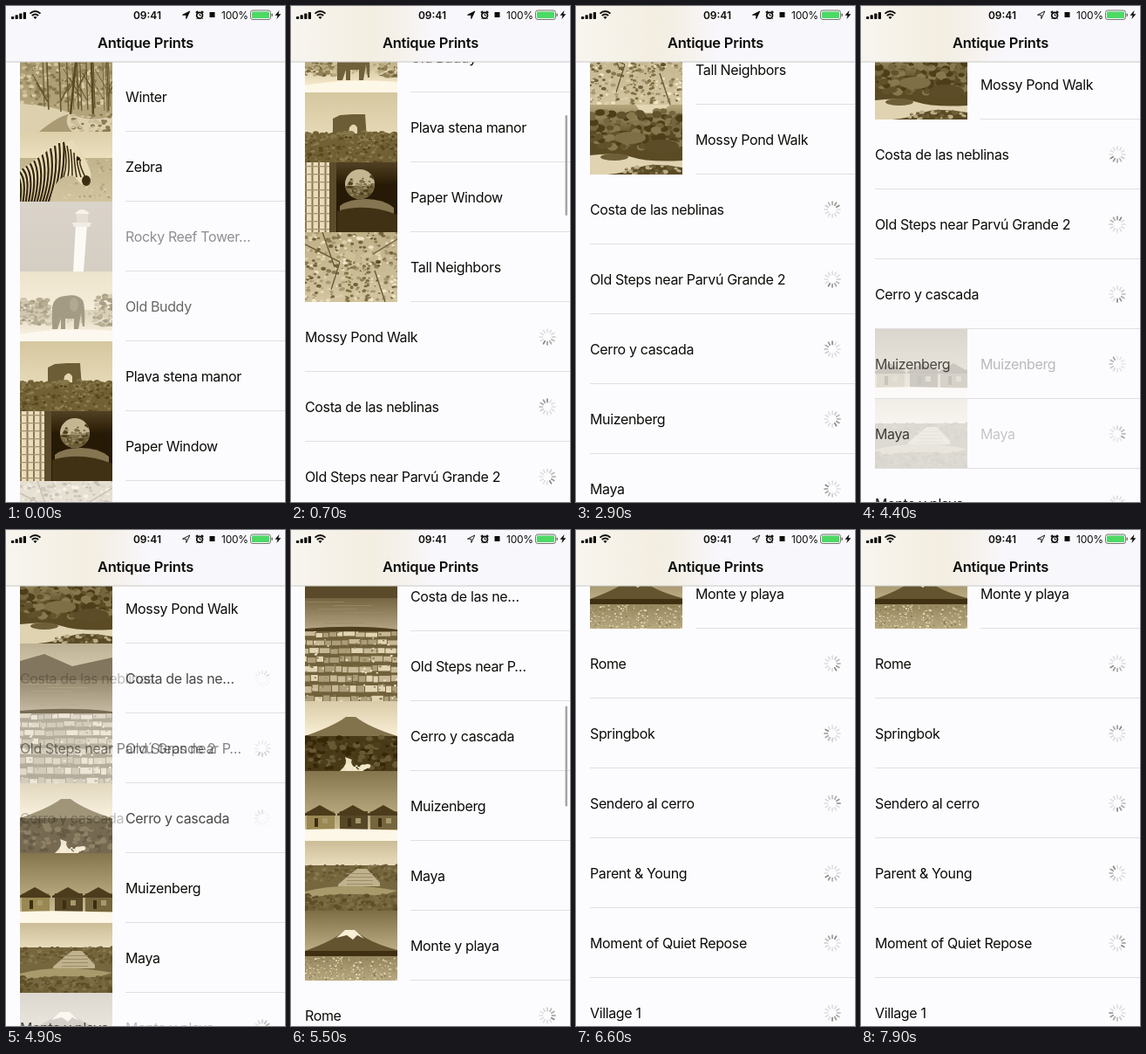
An HTML page with a canvas for the animation above (8 s loop, 320 px wide and 568 px high).

```html
<!DOCTYPE html>
<html lang="en">
<head>
<meta charset="utf-8">
<title>Photo list</title>
<style>
html, body { margin: 0; width: 100%; height: 100%; overflow: hidden; background: #fcfcff; }
canvas { display: block; width: 320px; height: 568px; }
</style>
</head>
<body>
<canvas id="stage"></canvas>
<script>
const W = 320, H = 568, NAV = 64, ROW = 80, LOOP = 8000;
const INK = '#0c0c08';
const dpr = window.devicePixelRatio || 1;
const stage = document.getElementById('stage');
stage.width = W * dpr;
stage.height = H * dpr;
const c = stage.getContext('2d');
const clamp = (v, a = 0, b = 1) => Math.min(b, Math.max(a, v));

// ---- thumbnails, each 106 x 80 ----
let g, seed;
const rnd = () => (seed = seed * 16807 % 2147483647) / 2147483647;
const shape = (color, d) => { g.fillStyle = color; g.fill(new Path2D(d)); };
const box = (color, x, y, w, h) => { g.fillStyle = color; g.fillRect(x, y, w, h); };
function line(color, width, d) {
  g.strokeStyle = color;
  g.lineWidth = width;
  g.stroke(new Path2D(d));
}
function oval(color, x, y, rx, ry) {
  g.fillStyle = color;
  g.beginPath();
  g.ellipse(x, y, rx, ry, 0, 0, 7);
  g.fill();
}
function fade(top, bottom, y = 0, h = 80) {
  const f = g.createLinearGradient(0, y, 0, y + h);
  f.addColorStop(0, top);
  f.addColorStop(1, bottom);
  box(f, 0, y, 106, h);
}
function dots(n, x, y, w, h, size, ...colors) {
  for (let i = 0; i < n; i++) {
    const r = size * (.5 + rnd());
    oval(colors[i % colors.length], x + rnd() * w, y + rnd() * h, r * 1.4, r);
  }
}

const scenes = [
  () => { // snowy wood
    fade('#a89c68', '#b5aa7a');
    dots(220, 0, 0, 106, 50, 1.5, '#85794a', '#c4ba90', '#d6cda8', '#968a58');
    shape('#d9d2b0', 'M0 48Q40 50 60 60T106 62V80H0Z');
    for (let i = 0; i < 14; i++) {
      const x = 4 + rnd() * 98, y = 15 + rnd() * 25, side = rnd() < .5 ? -12 : 12;
      line('#655a2c', .7 + rnd(), `M${x} 0L${x + 2} ${50 + rnd() * 8}M${x + 1} ${y + 10}L${x + side} ${y - 12}`);
    }
    line('#574b1e', 2.5, 'M64 0L58 60M82 0L84 62');
    shape('#a79c70', 'M22 80Q44 62 56 60Q50 70 60 80Z');
    dots(50, 60, 58, 46, 22, 1.5, '#8a7d4c', '#c8be98');
  },
  () => { // zebra
    fade('#d9d1a8', '#e8e1c2', 0, 30);
    fade('#bfb586', '#cfc69e', 30, 50);
    dots(60, 50, 32, 56, 45, 1, '#b0a678', '#d9d1b0');
    const body = 'M0 44Q22 30 36 18Q48 9 54 13L60 9L64 15Q74 26 81 46Q83 60 75 62Q68 60 62 50Q50 50 44 56Q36 66 35 80H0Z';
    shape('#e4dcbc', body);
    g.save();
    g.clip(new Path2D(body));
    for (let i = 0; i < 13; i++)
      line('#33290f', 2.2, `M${i * 5 - 10} ${46 - i * 3}Q${i * 4 + 5} 48 ${i * 3.2} 82`);
    for (let i = 0; i < 6; i++)
      line('#33290f', 1.5, `M${50 + i * 4} ${12 + i * 4}Q${56 + i * 2} 34 ${50 + i * 5} 52`);
    g.restore();
    oval('#3a2f14', 76, 56, 5, 6);
    oval('#1b1604', 67, 31, 2, 2);
  },
  () => { // lighthouse
    fade('#b0a394', '#a39782');
    shape('#fbf8ee', 'M64 26H77L73 80H61Z');
    shape('#e4dccc', 'M60 24H82L80 29H62Z');
    box('#c9beae', 65, 13, 13, 11);
    shape('#f0eade', 'M63 14Q71 4 80 14Z');
  },
  () => { // elephant
    fade('#e2d8a8', '#eee7c8', 0, 44);
    fade('#c9be8a', '#fbf8ea', 44, 36);
    dots(150, -4, 32, 38, 28, 1.8, '#8f834c', '#b5aa78', '#75693a');
    dots(90, 86, 28, 24, 34, 1.8, '#8f834c', '#c0b688', '#75693a');
    dots(60, 30, 48, 60, 10, 1.5, '#b5aa78', '#cfc69a');
    shape('#6f6238', 'M37 66V42Q38 29 52 28Q66 25 72 33Q75 40 74 63H72L70 48L67 66H62V54H52V66H47V54L43 66Z');
    oval('#85794e', 62, 38, 5, 8);
    shape('#fbf8ea', 'M0 72Q50 63 106 68V80H0Z');
  },
  () => { // ruin
    fade('#d3c99c', '#e4dcb8', 0, 52);
    box('#6f622c', 0, 47, 106, 33);
    shape('#6a5e32', 'M32 54V30L40 26L54 25L69 25L71 54H60V40Q56 33 51 40L49 54Z');
    dots(90, 0, 46, 106, 6, 2, '#6f622c', '#85783f');
    dots(260, 0, 50, 106, 30, 1.2, '#574a1a', '#8a7d45', '#72652e');
  },
  () => { // screen and round window
    box('#241a0c', 0, 0, 106, 80);
    fade('#4f4028', '#241a0c', 0, 26);
    box('#e6dec0', 0, 0, 30, 80);
    for (let x = 0; x < 31; x += 7.5) box('#8a7a50', x, 0, 2, 80);
    for (let y = 4; y < 80; y += 9) box('#a3956c', 0, y, 30, 1.3);
    box('#5b4c2c', 28, 0, 8, 80);
    oval('#c2b78e', 63, 25, 17, 17);
    g.save();
    g.beginPath();
    g.arc(63, 25, 17, 0, 7);
    g.clip();
    box('#6b5f36', 46, 27, 34, 15);
    dots(60, 46, 16, 34, 24, 1.4, '#7d7148', '#958a60', '#4d4220');
    g.restore();
    shape('#857650', 'M40 60V50Q50 42 70 42T102 52V62Z');
    shape('#3d3119', 'M37 80V56Q70 46 106 60V80Z');
  },
  () => { // giraffes
    fade('#bdb282', '#cfc69e');
    dots(320, 0, 0, 106, 80, 1.4, '#877b4c', '#d8d0a8', '#a59a6c', '#ece5c8', '#6e6238');
    line('#6a5d34', 1.4, 'M0 14L40 34L30 66M106 8L70 30M20 0L34 40M92 80L80 44');
    for (const [x, lean] of [[54, -8], [68, 9]]) {
      line('#cdc294', 7, `M${x} 80Q${x + lean} 52 ${x} 28L${x + lean} 24`);
      for (let y = 30; y < 78; y += 5) dots(3, x - 4 + lean * .4, y, 7, 4, 1.1, '#7d7040');
    }
    oval('#5a4e2a', 84, 34, 3, 2);
  },
  () => { // pond garden
    fade('#b5a878', '#5a4d24', 0, 36);
    box('#594c22', 0, 30, 106, 50);
    shape('#e0d8b4', 'M52 0H92L78 12L58 8Z');
    dots(170, 0, 7, 106, 43, 3, '#4b3f18', '#74683a', '#5f5328', '#857a48');
    oval('#7d7140', 46, 38, 18, 7);
    oval('#5a4e26', 82, 48, 20, 8);
    shape('#ddd5b2', 'M0 58Q30 54 48 60T106 64V72Q70 66 56 72T20 80H0Z');
    oval('#6c6034', 28, 60, 16, 4);
    dots(30, 40, 70, 66, 10, 1.8, '#6d6136', '#b9ae84');
  },
  () => { // lake
    fade('#a89a70', '#c4b88c', 0, 30);
    shape('#584b2a', 'M0 20L28 12L60 26L106 16V45H0Z');
    fade('#75663f', '#b5a888', 42, 38);
    for (let i = 0; i < 7; i++) box('#9c8d66', rnd() * 60, 46 + i * 4, 45, .7);
    shape('#4a3d20', 'M0 77Q60 72 106 78V80H0Z');
  },
  () => { // stone steps
    box('#6f6238', 0, 0, 106, 80);
    for (let y = 0; y < 80; y += 9 + y / 20) {
      for (let x = -rnd() * 8; x < 106;) {
        const w = 6 + rnd() * 10;
        box(['#ddd5b4', '#c4ba94', '#aa9f76'][rnd() * 3 | 0], x, y + rnd() * 2, w - 1, 5 + y / 25);
        x += w;
      }
    }
    dots(120, 0, 0, 106, 80, .8, '#857a50', '#ece6ce');
  },
  () => { // volcano and falls
    fade('#d6cdaa', '#f6f2e2', 0, 42);
    shape('#80744a', 'M0 40Q34 28 47 18H58Q74 30 106 40V50H0Z');
    box('#463a18', 0, 40, 106, 40);
    dots(150, 0, 41, 106, 37, 2.2, '#332809', '#665a30', '#4b3f1c');
    shape('#e8e2c8', 'M46 64L54 67Q50 73 64 80H40Q50 72 46 64Z');
    dots(10, 46, 74, 26, 5, 2, '#efe9d4');
  },
  () => { // beach huts
    fade('#857648', '#cbbf8e', 0, 70);
    for (const [x, wall] of [[0, '#9a8a40'], [38, '#54472a'], [73, '#75673a']]) {
      box(wall, x + 2, 46, 32, 21);
      shape('#4a3d1e', `M${x - 1} 49L${x + 17} 39L${x + 35} 49V51H${x - 1}Z`);
      box('#3a2e14', x + 11, 54, 4, 10);
      box('#a89b62', x + 20, 54, 6, 6);
    }
    shape('#fbf8ea', 'M0 67Q50 65 106 68V80H0Z');
  },
  () => { // pyramid in a clearing
    fade('#c9be94', '#e6dfc2', 0, 30);
    box('#75683a', 0, 28, 106, 52);
    dots(130, 0, 28, 106, 18, 1.4, '#645828', '#857a48', '#6d6134');
    shape('#bdb38c', 'M38 50L52 38L60 32H71L86 48V52H38Z');
    for (let y = 37; y < 50; y += 4) box('#9a8f66', 48, y, 30, 1);
    shape('#a89c60', 'M0 58Q46 46 106 57L86 63Q44 58 0 66Z');
    dots(150, 0, 62, 106, 18, 1.8, '#5c5024', '#7d7142', '#6d6132');
  },
  () => { // volcano and lake
    fade('#7d6f42', '#c4b88a', 0, 52);
    shape('#62562e', 'M0 46Q34 34 46 22H57Q72 36 106 45V54H0Z');
    shape('#f4f0e0', 'M36 31L46 22H57L68 32L60 28L55 33L48 28Z');
    box('#3d3116', 0, 46, 106, 6);
    fade('#94885a', '#b5aa7c', 52, 28);
    dots(260, 0, 53, 106, 27, .6, '#d9d1ac', '#857a4c', '#ece6cc');
  }
];

const thumbs = scenes.map((draw, i) => {
  const cv = document.createElement('canvas');
  cv.width = 106 * dpr;
  cv.height = 80 * dpr;
  g = cv.getContext('2d');
  g.scale(dpr, dpr);
  seed = 901 + i * 77;
  draw();
  // warm the whole picture to one sepia tone
  g.globalCompositeOperation = 'color';
  g.globalAlpha = .5;
  box('#8c7a58', 0, 0, 106, 80);
  return cv;
});

// ---- list: label, time its picture starts to appear, shortened label ----
const rows = [
  ['Winter', -999], ['Zebra', -999], ['Rocky Reef Tower…', -180], ['Old Buddy', -250],
  ['Plava stena manor', -999], ['Paper Window', -999], ['Tall Neighbors', -150],
  ['Mossy Pond Walk', 2200], ['Costa de las neblinas', 4600, 'Costa de las ne…'],
  ['Old Steps near Parvú Grande 2', 4700, 'Old Steps near P…'],
  ['Cerro y cascada', 4600], ['Muizenberg', 4290], ['Maya', 4310], ['Monte y playa', 4800],
  ['Rome'], ['Springbok'], ['Sendero al cerro'], ['Parent & Young'],
  ['Moment of Quiet Repose'], ['Village 1'], ['Harbour']
];

// ---- scrolling: time, offset ----
const keys = [
  [0, 0], [100, 12], [300, 85], [500, 185], [700, 285], [1000, 408], [1300, 482], [1550, 507], [1750, 511],
  [3300, 511], [3500, 545], [3700, 570], [3850, 574],
  [5400, 574], [5500, 668], [5600, 766], [5800, 922], [6000, 1023], [6150, 1062], [6280, 1071], [LOOP, 1071]
];
const moves = [[100, 1750], [3300, 3850], [5450, 6280]];

function slope(i) {
  const d = k => keys[k] && keys[k + 1] ? (keys[k + 1][1] - keys[k][1]) / (keys[k + 1][0] - keys[k][0]) : 0;
  const a = d(i - 1), b = d(i);
  return a * b > 0 ? 2 * a * b / (a + b) : 0;
}
function offset(t) {
  const i = Math.max(0, keys.findIndex(k => k[0] > t) - 1);
  const [t0, a] = keys[i], [t1, b] = keys[i + 1], h = t1 - t0, u = (t - t0) / h;
  const e = u * u * (3 - 2 * u);
  return a + (b - a) * e + h * u * (1 - u) * (slope(i) * (1 - u) - slope(i + 1) * u);
}

// ---- drawing ----
function text(s, x, y, font, spacing, align = 'left') {
  c.font = font + ' Inter, Roboto, sans-serif';
  c.letterSpacing = spacing + 'px';
  c.textAlign = align;
  c.fillStyle = INK;
  c.fillText(s, x, y);
}
function rect(color, x, y, w, h, r = 0) {
  c.fillStyle = color;
  c.beginPath();
  c.roundRect(x, y, w, h, r);
  c.fill();
}
function stroke(color, width, d) {
  c.strokeStyle = color;
  c.lineWidth = width;
  c.stroke(new Path2D(d));
}

function spinner(y, step, alpha) {
  c.save();
  c.translate(294, y);
  c.lineCap = 'round';
  for (let k = 0; k < 12; k++) {
    const age = ((step - k) % 12 + 12) % 12;
    c.globalAlpha = alpha * Math.max(.25, 1 - age / 7);
    stroke('#8b8981', 1.7, 'M0 -5.5V-9');
    c.rotate(Math.PI / 6);
  }
  c.restore();
}

function row(i, y, t) {
  const [name, start, short = name] = rows[i];
  const a = start === undefined ? 0 : clamp((t - start) / 400);
  const waiting = start < 0 ? 0 : 1 - a; // the first rows never show a placeholder
  const label = (s, x, alpha) => {
    c.globalAlpha = alpha;
    if (alpha) text(s, x, y + 45.5, '16px', -.36);
  };
  if (a) {
    c.globalAlpha = a;
    c.drawImage(thumbs[i], 16, y, 106, 79.5);
  }
  label(short, 137, a);
  label(name, 16, waiting);
  if (waiting) spinner(y + 40, Math.floor(t / 83.33) + i * 5, waiting);
  c.globalAlpha = 1;
  const x = waiting > .5 ? 16 : 137;
  rect('#e0dee0', x, y + 79, W - x, 1);
}

function statusBar(t) {
  for (let i = 0; i < 4; i++) rect(INK, 6 + i * 4.6, 12 - i * 1.7, 3.2, 3 + i * 1.7, .7);
  c.lineCap = 'butt';
  stroke(INK, 1.9, 'M27.5 8.6Q33.5 3.2 39.5 8.6M29.8 11Q33.5 7.8 37.2 11');
  c.fill(new Path2D('M31.4 12.8Q33.5 11 35.6 12.8L33.5 15Z'));
  text('09:41', 162, 14.5, '600 12px', 0, 'center');
  const arrow = 'M202.5 10.2L210.8 6L206.8 14.5V10.3Z';
  if (t < 3500) c.fill(new Path2D(arrow));
  stroke(INK, .9, arrow);
  stroke(INK, 1.7, 'M218.7 10.8a3.4 3.4 0 1 0 6.8 0a3.4 3.4 0 1 0 -6.8 0M217.8 7.6L220 5.8M226.4 7.6L224.2 5.8');
  stroke(INK, 1, 'M222.1 8.8V11H224M219.6 13.8L218.6 15M224.6 13.8L225.6 15');
  rect(INK, 233.5, 7, 6, 6);
  text('100%', 247, 14.5, '12px', -.25);
  c.strokeStyle = '#75756e';
  c.lineWidth = 1;
  c.beginPath();
  c.roundRect(280.5, 5, 23, 10.5, 2.5);
  c.stroke();
  rect('#4cd964', 282, 6.5, 20, 7.5, 1);
  rect('#75756e', 304.5, 8.5, 1.5, 3.5, .7);
  c.fillStyle = INK;
  c.fill(new Path2D('M313.5 5L308.5 10.8H311.5L310.4 15L315.4 9.2H312.4Z'));
}

function navBar(t, s) {
  rect('#f8f7fc', 0, 0, W, NAV);
  const tint = c.createLinearGradient(0, 0, 165, 0);
  tint.addColorStop(0, '#f8f5f0');
  tint.addColorStop(.55, '#f3eee0');
  tint.addColorStop(.75, '#f5f1ea');
  tint.addColorStop(1, '#f8f7fc');
  c.globalAlpha = clamp(s / 150);
  rect(tint, 0, 0, 165, NAV);
  c.globalAlpha = 1;
  rect('#cbc9c6', 0, NAV - .5, W, 1);
  statusBar(t);
  text('Antique Prints', 160, 48, '600 16.5px', -.2, 'center');
}

function frame(now) {
  const t = Math.floor(now % LOOP / 100) * 100;
  const s = offset(t);
  c.setTransform(dpr, 0, 0, dpr, 0, 0);
  rect('#fcfcff', 0, 0, W, H);
  rows.forEach((_, i) => {
    const y = NAV + i * ROW - s;
    if (y > NAV - ROW && y < H) row(i, y, t);
  });
  for (const [from, to] of moves)
    if (t >= from) {
      c.globalAlpha = clamp(1 - (t - to - 50) / 200);
      rect('#a6a5a2', 314.5, 68 + s * .2, 2.5, 115, 1.25);
    }
  c.globalAlpha = 1;
  navBar(t, s);
  requestAnimationFrame(frame);
}
requestAnimationFrame(frame);
</script>
</body>
</html>
```
